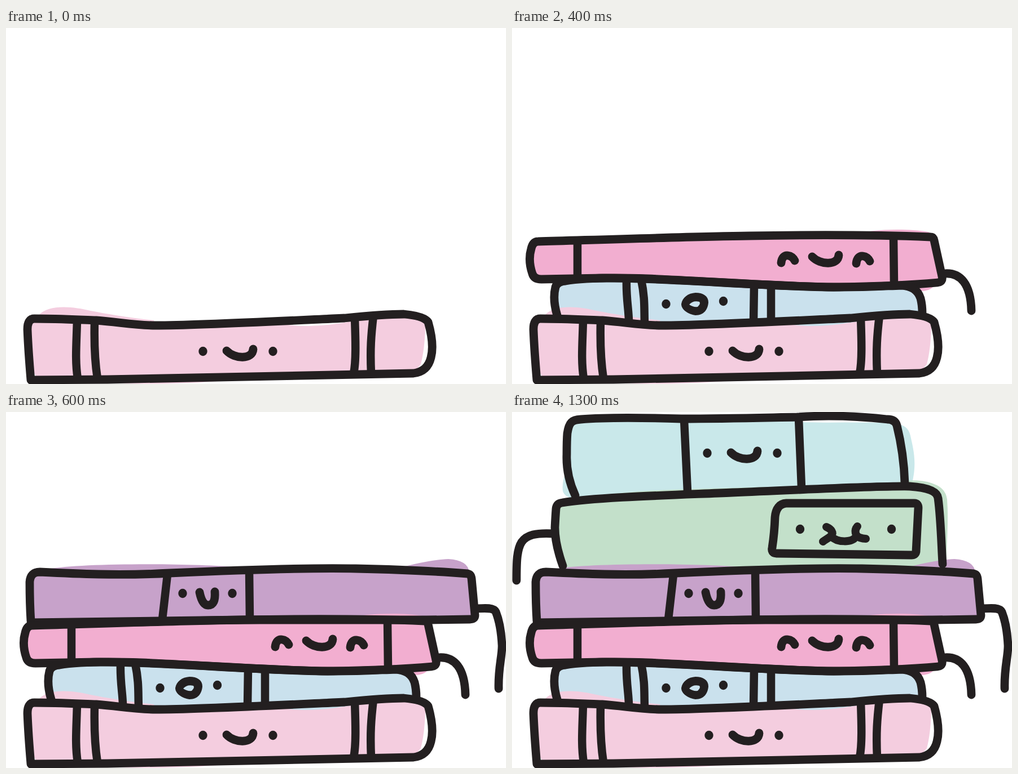
Write an HTML page that moves like this. It is 886x632 px and loops after 1.5 s.

```html
<!DOCTYPE html>
<html lang="en">
<head>
<meta charset="utf-8">
<title>Stack of books</title>
<style>
html, body { margin: 0; width: 100%; height: 100%; overflow: hidden; background: #fff; }
svg { display: block; width: 100%; height: 100%; }
.lines { fill: none; stroke: #231f20; stroke-width: 14.8; stroke-linecap: round; stroke-linejoin: round; }
.band { stroke-width: 14.5; stroke-linecap: butt; }
.dot { fill: #231f20; stroke: none; }
.b2, .b3, .b4, .b5, .b6 { animation: show2 1500ms step-end infinite; }
.b3 { animation-name: show3; }
.b4 { animation-name: show4; }
.b5 { animation-name: show5; }
.b6 { animation-name: show6; }
@keyframes show2 { 0% { visibility: hidden } 13.333%, 100% { visibility: visible } }
@keyframes show3 { 0% { visibility: hidden } 26.666%, 100% { visibility: visible } }
@keyframes show4 { 0% { visibility: hidden } 40%, 100% { visibility: visible } }
@keyframes show5 { 0% { visibility: hidden } 53.333%, 100% { visibility: visible } }
@keyframes show6 { 0% { visibility: hidden } 66.666%, 100% { visibility: visible } }
</style>
</head>
<body>
<svg viewBox="0 0 886 632" preserveAspectRatio="none">
  <defs>
    <ellipse id="eye" class="dot" rx="7.700" ry="8.200"/>
    <path id="smile" d="M-27 -1C-13 14 19 15 20 -4"/>
    <path id="wink" d="M-12 8C-11 -2 -6 -6 0 -5Q8 -4 12 4"/>
  </defs>

  <!-- colour, top book first -->
  <g>
    <path class="b6" fill="#c9e8ea" d="M98 30Q102 13 125 13L500 11L515 18C570 20 620 17 676 20Q702 22 706 42C711 65 718 90 709 126L690 145L110 155Q92 150 90 140Q88 125 96 105Q92 70 98 30Z"/>
    <path class="b5" fill="#c3e0ca" d="M80 163C150 144 240 139 310 137L420 134L670 128C700 119 730 120 748 128Q768 135 771 155C774 195 770 235 769 273L770 285L90 287C80 250 76 210 80 163Z"/>
    <path class="b4" fill="#c7a2ca" d="M44 295Q45 284 75 279C130 268 330 268 415 276L480 279L700 276C730 268 760 262 784 261Q818 263 821 284L829 367L400 372L45 373Z"/>
    <path class="b3" fill="#f2aed0" d="M36 385Q38 379 60 379L600 368C640 356 700 356 738 362L750 370Q759 388 759 400Q764 410 765 442Q752 448 746 460Q738 468 720 467L560 460C430 458 260 444 160 445L45 445Q34 440 32 415Z"/>
    <path class="b2" fill="#cae1ed" d="M78 460Q82 450 100 449C150 443 210 443 250 445C370 451 480 459 570 461L690 458Q720 459 724 482L726 508L610 522C570 530 530 532 480 530L250 528L82 512Q74 485 78 460Z"/>
    <path fill="#f4cddf" d="M40 525L58 510C75 490 118 494 150 502C185 509 225 515 262 519L265 528L480 524C530 534 575 527 612 521L620 514L725 511Q741 514 743 530Q742 570 735 597L722 612L420 622C370 630 270 634 180 630L60 622Q50 618 49 608L38 590Z"/>
  </g>

  <g class="lines">
    <g class="b6">
      <path d="M112 148C100 122 96 100 97 75Q97 50 98 38C101 18 106 14 122 13C170 9 230 10 300 12C380 12 450 10 505 9C560 5 620 8 665 13Q679 13 682 24C691 60 695 95 696 126"/>
      <path class="band" d="M305 14L311 141M508 11L513 134"/>
      <use href="#eye" x="346" y="73"/><use href="#eye" x="470" y="73"/>
      <use href="#smile" x="415" y="73"/>
    </g>
    <g class="b5">
      <path d="M90 273C80 245 76 220 76 205Q77 185 78 172Q79 162 89 161C150 151 300 147 390 143C520 138 640 131 705 132Q753 135 755 153C760 190 761 240 763 270"/>
      <path d="M75 216C42 214 26 218 17 231C8 245 8 270 8 299"/>
      <path d="M466 187Q468 163 486 162L713 162Q720 162 720 170L716 248Q715 254 708 254L468 251Q459 250 461 241Q465 215 466 187Z"/>
      <use href="#eye" x="510.500" y="208"/><use href="#eye" x="672.500" y="208"/>
      <path stroke-width="14" d="M557 204C566 208 570 214 566 219C563 223 556 226 551 230M566 221C576 232 602 232 609 222M612 203C606 210 608 220 616 223Q622 225 627 225"/>
    </g>
    <g class="b4">
      <path d="M44 371C42 340 42 320 42 302Q43 284 60 284C120 287 200 291 290 286C400 281 530 276 620 278C710 280 780 284 818 287Q824 288 825 296L831 361Q831 368 822 368L745 369L420 369L44 374"/>
      <path d="M834 349C850 348 864 347 868 355C876 375 878 395 879 415C879 435 872 455 873 491"/>
      <path class="band" d="M286 289L277 368M431 283L432 368"/>
      <use href="#eye" x="313" y="322"/><use href="#eye" x="401" y="322"/>
      <path d="M343 320C346 335 351 343 358 343C368 343 371 334 370 319"/>
    </g>
    <g class="b3">
      <path d="M46 379C150 376 330 370 420 369C530 367 640 367 742 371Q747 371 748 377L762 441Q764 451 754 452C700 457 640 459 570 460C430 458 270 443 160 444L52 446Q39 446 36 436Q28 412 34 392Q37 379 46 379Z"/>
      <path d="M765 436C795 433 813 455 814 502"/>
      <path class="band" d="M116 379L116 443M676 371L677 455"/>
      <use href="#wink" x="489" y="409"/><use href="#wink" x="622" y="410"/>
      <use href="#smile" x="559" y="407"/>
    </g>
    <g class="b2">
      <path d="M80 510C74 490 74 472 77 460Q80 450 95 449C130 443 180 443 240 445C350 449 470 459 560 460C620 461 660 458 690 457Q717 458 724 480Q727 492 727 506"/>
      <path class="band" d="M203 447C202 480 207 500 207 521M229 447C236 480 234 500 235 524M429 456L428 522M459 458L459 520"/>
      <use href="#eye" x="273" y="490"/><use href="#eye" x="374.500" y="485"/>
      <path class="dot" fill-rule="evenodd" d="M300 490C302 478 312 471 325 470C339 470 348 476 348 487C347 500 340 510 325 510C312 508 300 500 300 490ZM314 491Q321 483 332 486Q335 489 329 495Q321 496 314 491Z"/>
    </g>
    <g>
      <path d="M44 625C41 590 39 560 38 535Q38 516 50 516C90 516 130 518 160 519C200 522 230 528 265 528C340 528 470 521 600 515C650 510 680 508 705 508Q740 511 748 522C756 550 757 570 753 585Q747 610 722 613C500 617 300 622 180 624Z"/>
      <path class="band" d="M126 518C125 560 122 590 127 622M157 520C156 560 157 590 162 622M618 514C619 545 621 590 616 613M651 511C647 545 645 570 647 613"/>
      <use href="#eye" x="349" y="574"/><use href="#eye" x="473" y="574"/>
      <use href="#smile" x="418" y="574"/>
    </g>
  </g>
</svg>
</body>
</html>
```
